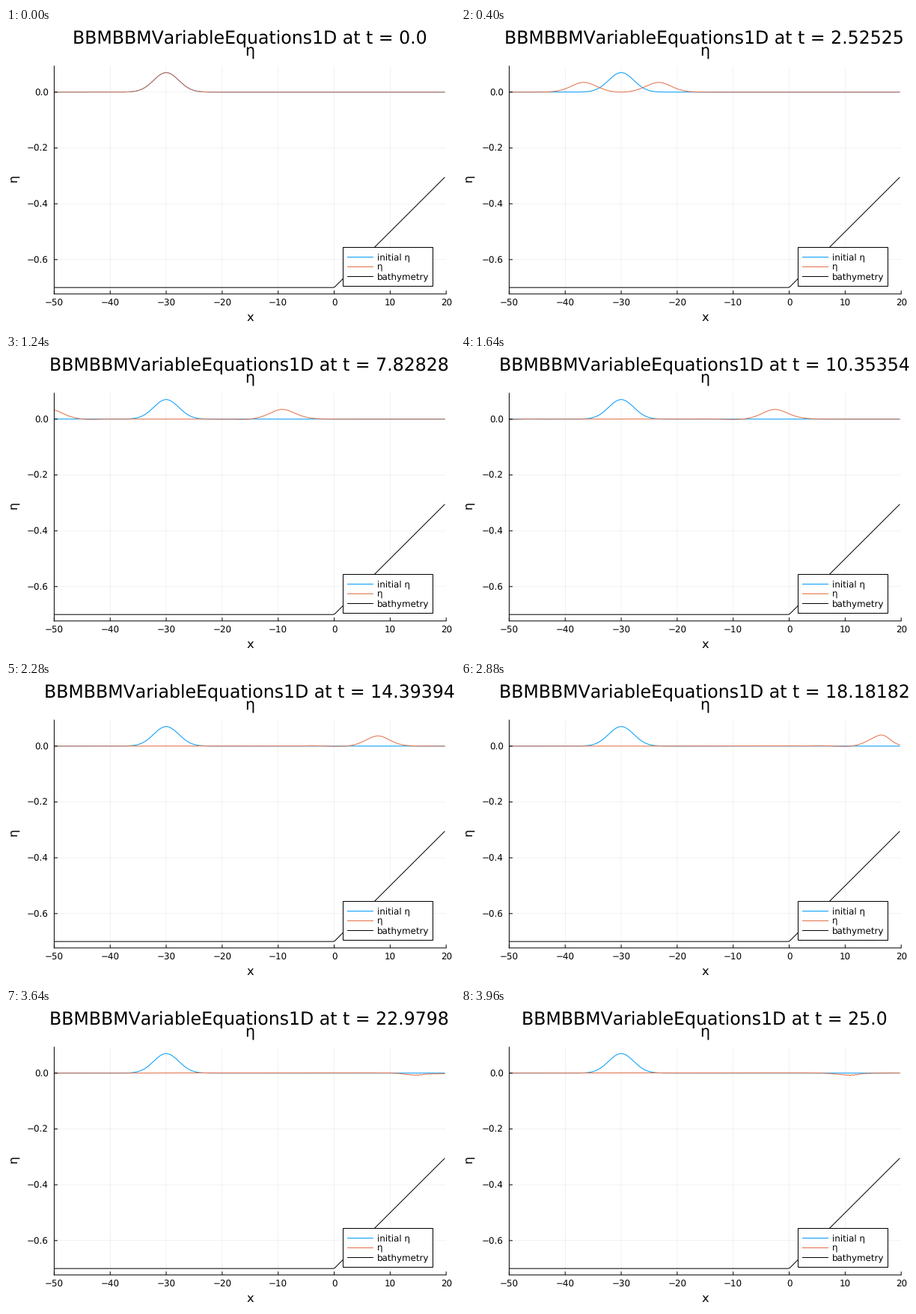
These frames come from a looping animation (600 px wide and 400 px high, 4 s). A matplotlib script:

```python
import numpy as np
import matplotlib.pyplot as plt
from matplotlib.animation import FuncAnimation
from matplotlib.patches import Rectangle

W, H, DPI = 600, 400, 100
FRAMES, T_END, SUBSTEPS = 100, 25.0, 5
PX = 72 / DPI
BLUE, ORANGE = "#009AFA", "#E36F47"
LEFT, RIGHT, TOP, BOTTOM = 64.4, 588.2, 51.0, 355.8

plt.rcParams.update({
    "font.family": "DejaVu Sans",
    "text.hinting": "none",
    "text.kerning_factor": 6,
})

# BBM-BBM equations over a sloping bed, periodic domain
G, N, X0, X1 = 9.81, 512, -130.0, 20.0
dx = (X1 - X0) / N
x = X0 + dx * np.arange(N)
depth = np.where(x < 0, 0.7, 0.7 - x / 50)


def stencil(weights):
    eye = np.eye(N)
    return sum(w * np.roll(eye, k, axis=1) for k, w in weights.items())


D1 = stencil({-2: 1, -1: -8, 1: 8, 2: -1}) / (12 * dx)
D2 = stencil({-2: -1, -1: 16, 0: -30, 1: 16, 2: -1}) / (12 * dx ** 2)
K = np.diag(depth ** 2)
A_eta = -np.linalg.solve(np.eye(N) - D1 @ K @ D1 / 6, D1)
A_vel = -np.linalg.solve(np.eye(N) - D2 @ K / 6, D1)


def rhs(q):
    eta, v = q
    return np.array([A_eta @ ((eta + depth) * v),
                     A_vel @ (G * eta + v * v / 2)])


def solve():
    q = np.array([0.07 * np.exp(-0.1 * (x + 30) ** 2), np.zeros(N)])
    dt = T_END / (FRAMES - 1) / SUBSTEPS
    states = [q[0]]
    for _ in range(FRAMES - 1):
        for _ in range(SUBSTEPS):
            k1 = rhs(q)
            k2 = rhs(q + dt / 2 * k1)
            k3 = rhs(q + dt / 2 * k2)
            k4 = rhs(q + dt * k3)
            q = q + dt / 6 * (k1 + 2 * k2 + 2 * k3 + k4)
        states.append(q[0])
    return states


waves = solve()

fig = plt.figure(figsize=(W / DPI, H / DPI), dpi=DPI, facecolor="white")
ax = fig.add_axes([LEFT / W, 1 - BOTTOM / H,
                   (RIGHT - LEFT) / W, (BOTTOM - TOP) / H])
ax.set_xlim(-50, 20)
ax.set_ylim(-0.7231, 0.0931)
ax.axis("off")

# overlay in pixel coordinates for axis lines, text and legend
over = fig.add_axes([0, 0, 1, 1])
over.set_xlim(0, W)
over.set_ylim(H, 0)
over.axis("off")

TICK, GUIDE, TITLE, SUP = 11.84, 16.3, 20.7, 23.68
TICK_LEN = 4.5
GRID = dict(color="black", alpha=0.1, lw=0.5 * PX, snap=False, zorder=1)


def label(px, py, s, size, ha="center", **kw):
    return over.text(px, py, s, fontsize=size * PX, ha=ha, va="baseline", **kw)


def line(xa, ya, xb, yb, color="black", cap="butt"):
    over.plot([xa, xb], [ya, yb], color=color, lw=PX, snap=False,
              solid_capstyle=cap)


def minus(s):
    return s.replace("-", "\u2212")


for v in range(-50, 21, 10):
    px = LEFT + (v + 50) / 70 * (RIGHT - LEFT)
    ax.axvline(v, **GRID)
    line(px, BOTTOM, px, BOTTOM - TICK_LEN)
    label(px, 372.3, minus(str(v)), TICK)
for v in (0.0, -0.2, -0.4, -0.6):
    py = TOP + (0.0931 - v) / 0.8162 * (BOTTOM - TOP)
    ax.axhline(v, **GRID)
    line(LEFT, py, LEFT + TICK_LEN, py)
    label(56.7, py + 4.8, minus(f"{v:.1f}"), TICK, ha="right")
line(LEFT, BOTTOM, RIGHT, BOTTOM, cap="projecting")
line(LEFT, BOTTOM, LEFT, TOP, cap="projecting")

mid = (LEFT + RIGHT) / 2
title = label(mid - 0.9, 20.7, "", SUP)
label(mid - 0.9, 38, "η", TITLE)
label(mid, 391.6, "x", GUIDE)
label(15.3, 201.3, "η", GUIDE, rotation=90, rotation_mode="anchor")


def curve(y, color):
    return ax.plot(x, y, color=color, lw=PX, snap=False, zorder=3)[0]


curve(waves[0], BLUE)
wave = curve(waves[0], ORANGE)
curve(-depth, "black")

over.add_patch(Rectangle((450.5, 293.5), 120, 52, fc="white", ec="black",
                         lw=PX, snap=False))
entries = [("initial η", BLUE), ("η", ORANGE), ("bathymetry", "black")]
for i, (name, color) in enumerate(entries):
    y = 306.5 + 13 * i
    line(456, y, 491, y, color)
    label(496, y + 3.7, name, TICK, ha="left")


def draw(i):
    t = round(i * T_END / (FRAMES - 1), 5)
    title.set_text(f"BBMBBMVariableEquations1D at t = {t}")
    wave.set_ydata(waves[i])
    return title, wave


anim = FuncAnimation(fig, draw, frames=FRAMES, interval=40,
                     init_func=lambda: draw(0), repeat=True, repeat_delay=0)
plt.show()
```
